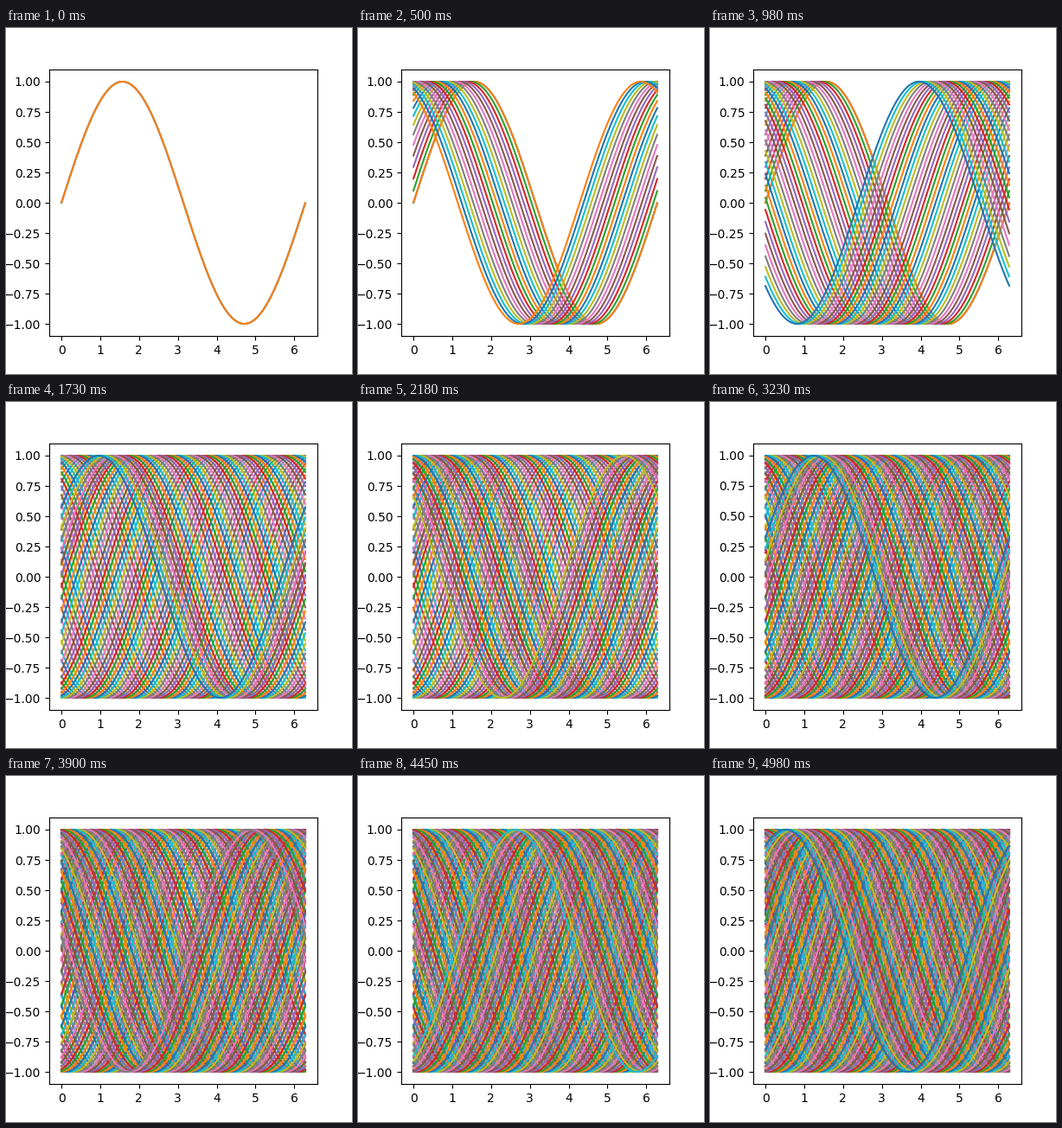
Animation, 400 px wide and 400 px high, one loop 5010 ms. Source, as a matplotlib script:

```python
import numpy as np
import matplotlib.pyplot as plt
from matplotlib.animation import FuncAnimation

STEPS = 200      # number of shifted waves
LOOP = 5010      # ms
TICK = 10        # ms

fig, ax = plt.subplots(figsize=(4, 4), dpi=100)
x = np.arange(0, 2 * np.pi, 0.01)


def wave(step):
    line, = ax.plot(x, np.sin(x + step / 10))
    return line


def build_stages():
    """Stack one wave per step; redraw everything only when the limits move."""
    wave(0)
    fig.canvas.draw()
    stages = []
    for step in range(STEPS):
        limits = ax.get_ylim()
        line = wave(step)
        if ax.get_ylim() != limits:
            fig.canvas.draw()
        else:
            ax.draw_artist(line)
        stages.append(np.asarray(fig.canvas.buffer_rgba())[..., :3].copy())
    return stages


def step_at(t):
    """Steps alternate between lasting 30 ms and 20 ms."""
    pair, rest = divmod(t, 50)
    return min(2 * pair + (rest >= 30), STEPS - 1)


stages = build_stages()
ax.remove()
view = fig.figimage(stages[0])


def update(frame):
    view.set_data(stages[step_at(frame * TICK)])
    return [view]


def start():
    return update(0)


anim = FuncAnimation(fig, update, frames=LOOP // TICK, init_func=start,
                     interval=TICK, repeat=True, repeat_delay=0)
plt.show()
```
